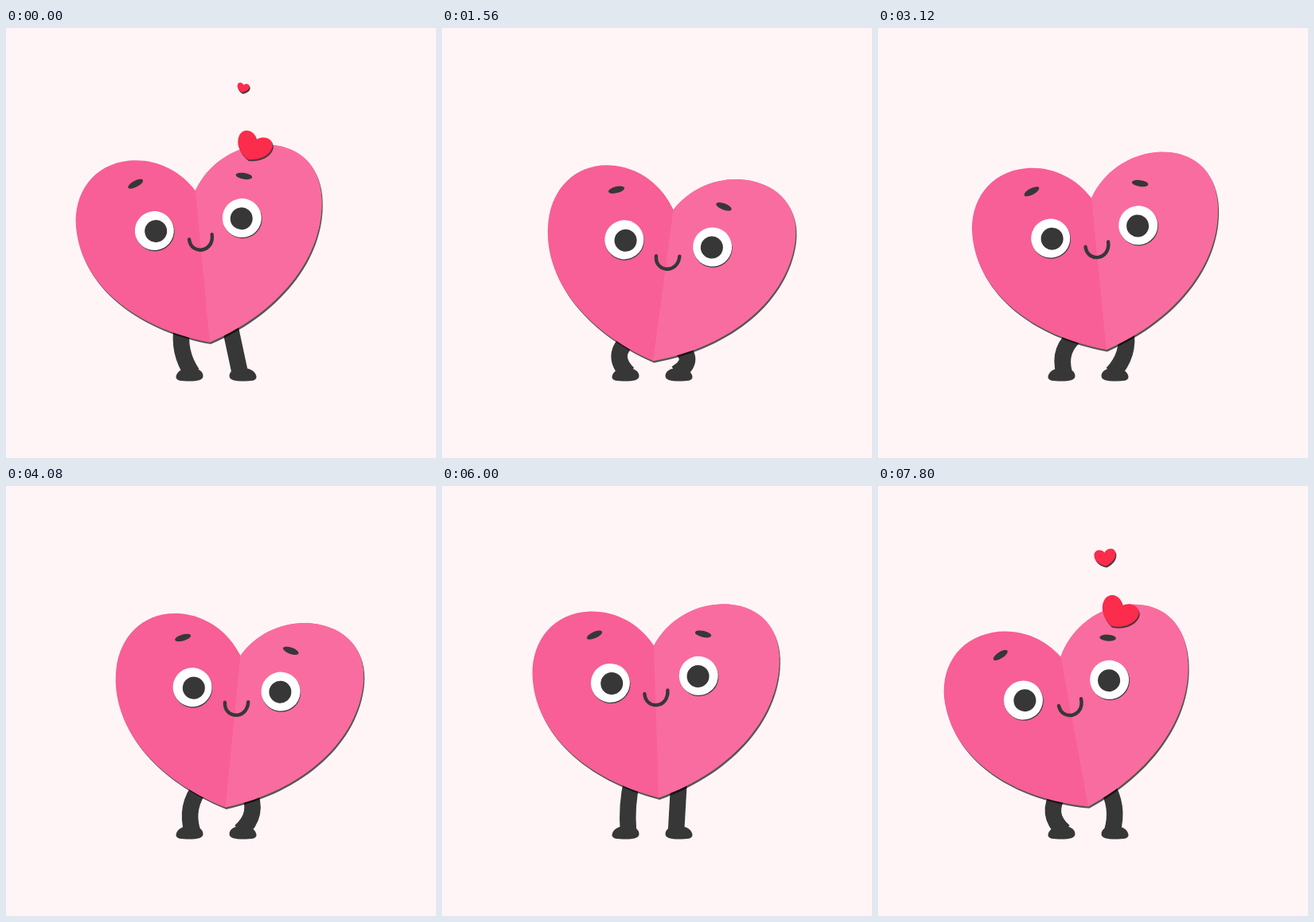
Animation of 540x540 px, one loop 7920 ms. Source, as an HTML page with a canvas:

```html
<!DOCTYPE html>
<html lang="en">
<head>
<meta charset="utf-8">
<title>Dancing heart</title>
<style>
html, body { margin: 0; width: 100%; height: 100%; overflow: hidden; background: #fff5f6; }
canvas { display: block; width: 540px; height: 540px; }
</style>
</head>
<body>
<canvas id="stage" width="540" height="540"></canvas>
<script>
const LOOP = 7920, STEP = 120, DARK = '#373737';
const ctx = document.getElementById('stage').getContext('2d');

const rightEdge = 'M0-95.6C18-127 52-145 85-145C128-145 157-119 157-77C157-5 97 64.5 0 95.6';
const leftEdge = 'C-92 69-153.5 8-153.5-63C-153.5-107-124-141-79-141C-48-141-18-125 0-95.6Z';
const rightHalf = new Path2D(rightEdge + 'Z');
const whole = new Path2D(rightEdge + leftEdge);
const mouth = new Path2D('M-13.5-35.5C-13-15 16.5-16 15.6-39');
const lids = new Path2D('M-79.5-50.5C-78-19-35-19-33.2-57M26.9-60.2C29-26 72-26 73-59.7');
const foot = new Path2D('M-17 4C-16-4-7-7 1-7C11-7 17 -3 17 3C17 8 10 9.5 0 9.5C-11 9.5-17 9-17 4Z');

const rad = deg => deg * Math.PI / 180;
const clamp = v => Math.min(1, Math.max(0, v));
const ramp = (t, a, b) => {
  const p = clamp((t - a) / (b - a));
  return p * p * (3 - 2 * p);
};

// Sway with a squat on each side; rests in the middle while the eyes are shut
function bodyAt(t) {
  const a = t < 6500 ? 72.5 + 0.3 * Math.min(t, 4800) : Math.max(-20, 72.5 + 0.3 * (t - LOOP));
  const w = 1 - ramp(t, 4800, 5240) + ramp(t, 7080, 7600);
  const hop = 5.5 * Math.sin(Math.PI * clamp((t - 4800) / 440));
  const mix = (rest, moving) => rest + w * (moving - rest);
  return {
    x: mix(269, 265.8 - 20 * Math.cos(rad(a - 54))),
    y: mix(296, 312.7 + 13.2 * Math.cos(rad(2 * a + 36))) - hop,
    tilt: mix(-1.8, -2.4 - 10 * Math.cos(rad(a)))
  };
}

const floaters = [
  { birth: 6840, life: 1740, x: 289, y: 240, rise: 150, sway: 26, rate: 400, size: 0.167 },
  { birth: 6360, life: 1680, x: 319, y: 258, rise: 198, sway: 35, rate: 550, size: 0.19 }
];

function place(x, y, tilt, size, paint) {
  ctx.save();
  ctx.translate(x, y);
  ctx.rotate(rad(tilt));
  ctx.scale(size, size);
  paint();
  ctx.restore();
}

function fill(path, color) {
  ctx.fillStyle = color;
  ctx.fill(path);
}

function drawFloater(f, t) {
  const u = ((t - f.birth + LOOP) % LOOP) / f.life;
  if (u <= 0 || u >= 1) return;
  const size = f.size * ramp(u, 0, 0.21) * (1 - u ** 4), phase = f.rate * u - 188;
  const x = f.x + f.sway * Math.sin(rad(phase)), y = f.y - f.rise * u;
  const tilt = 29 * Math.cos(rad(phase - 25));
  const paint = color => () => {
    ctx.translate(0, 44);
    fill(whole, color);
  };
  place(x + 1, y + 2, tilt, size, paint('#52333b'));
  place(x, y, tilt, size, paint('#fb2c4c'));
}

// Fixed-length leg whose knee bends outwards as the body drops
function leg(body, hip, ankle, side) {
  const c = Math.cos(rad(body.tilt)), s = Math.sin(rad(body.tilt));
  const hx = body.x + hip * c - 72 * s, hy = body.y + hip * s + 72 * c, ay = 434;
  const dx = ankle - hx, dy = ay - hy, d = Math.hypot(dx, dy);
  const bend = side * Math.sqrt(Math.max(0, 33 ** 2 - d * d / 4));
  ctx.beginPath();
  ctx.moveTo(hx, hy);
  ctx.quadraticCurveTo((hx + ankle) / 2 + bend * dy / d, (hy + ay) / 2 - bend * dx / d, ankle, ay);
  ctx.strokeStyle = DARK;
  ctx.lineCap = 'butt';
  ctx.lineWidth = 20.5;
  ctx.stroke();
  ctx.save();
  ctx.translate(ankle - side * -3.5, 434);
  ctx.scale(-side, 1);
  fill(foot, DARK);
  ctx.restore();
}

function oval(x, y, rx, ry, color, tilt = 0) {
  ctx.beginPath();
  ctx.ellipse(x, y, rx, ry, rad(tilt), 0, 2 * Math.PI);
  ctx.fillStyle = color;
  ctx.fill();
}

function eye(x, y, look, shut) {
  const open = 1 - 0.9 * shut, wide = 1 + 0.2 * shut, cy = y + 16 * shut;
  oval(x + 0.6, cy + 1.2, 24.5 * wide, 24.5 * open, DARK);
  oval(x, cy, 24.5 * wide, 24.5 * open, '#fff');
  oval(x + look, cy + 0.7, 14 * wide, 14 * open, DARK);
}

function face(shut) {
  ctx.strokeStyle = DARK;
  ctx.lineCap = 'round';
  ctx.lineWidth = 4.4;
  ctx.stroke(mouth);
  if (shut > 0.85) {
    ctx.stroke(lids);
  } else {
    eye(-56, -50.4, 1.8, shut);
    eye(55, -56, -0.7, shut);
  }
  oval(-74 + 1.8 * shut, -111.2 + 19.5 * shut, 10.4, 4, DARK, -22);
  oval(62.5 - 1.5 * shut, -108.2 + 15.2 * shut, 10.4, 4, DARK, 14);
}

function draw(t) {
  const body = bodyAt(t);
  const shut = ramp(t, 6060, 6300) - ramp(t, 7320, 7560);
  ctx.fillStyle = '#fff5f6';
  ctx.fillRect(0, 0, 540, 540);
  leg(body, -32.5, 234, -1);
  leg(body, 26.5, 294, 1);
  place(body.x + 1.3, body.y + 2.4, body.tilt, 1, () => fill(whole, 'rgba(0,0,0,.65)'));
  place(body.x, body.y, body.tilt, 1, () => {
    fill(whole, '#f75f96');
    fill(rightHalf, '#f96c9f');
    face(shut);
  });
  floaters.forEach(f => drawFloater(f, t));
}

const start = performance.now();
function tick() {
  const t = (performance.now() - start) % LOOP;
  draw(Math.floor(t / STEP) * STEP);
  requestAnimationFrame(tick);
}
tick();
</script>
</body>
</html>
```
